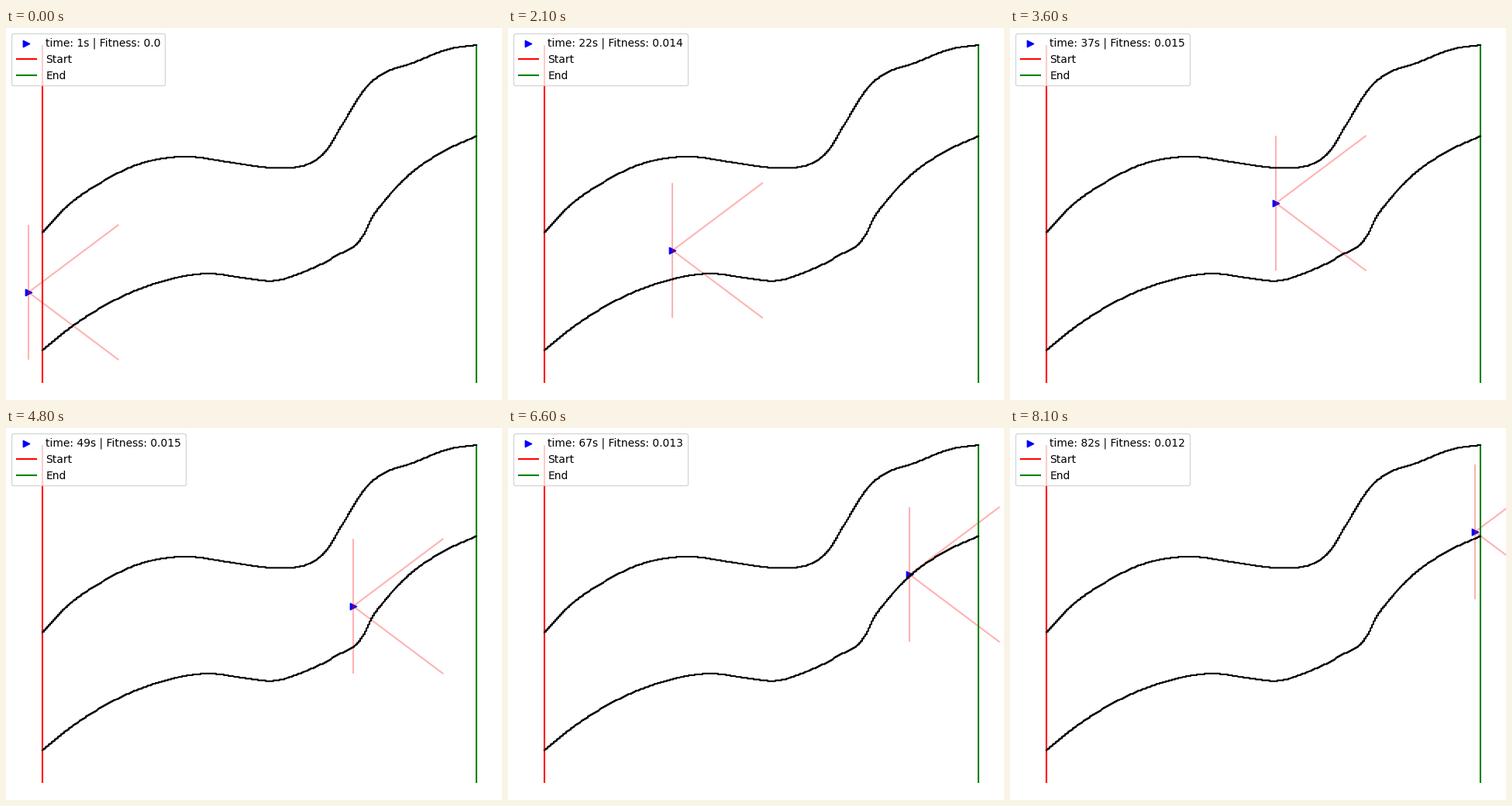
Animation, 640 px wide and 480 px high, one loop 8200 ms. Source, as a matplotlib script:

```python
import numpy as np
import matplotlib.pyplot as plt
from matplotlib.animation import FuncAnimation
from matplotlib.collections import LineCollection

W, H = 640, 480
FRAMES, INTERVAL = 82, 100
UNIT_X, UNIT_Y = W / 1.1, H / 1.1    # one data unit in pixels, 5 % margins
LEFT, TOP = 0.05 * UNIT_X, 0.05 * UNIT_Y
START_X, END_X = 47, 607
CRUISE = 0.015 * UNIT_X
REACH_X, REACH_Y = 0.2 * UNIT_X, 0.2 * UNIT_Y
RAYS = np.array([(0, -REACH_Y), (REACH_X, -REACH_Y),
                 (REACH_X, REACH_Y), (0, REACH_Y)])

UPPER = [(47, 264), (80, 229), (120, 201), (165, 178), (230, 166),
         (290, 173.5), (338, 180), (372, 180), (386, 177), (415, 156),
         (432, 128), (470, 71), (485, 60), (525, 45), (572, 27), (607, 22)]
LOWER = [(47, 416), (80, 389), (124, 360), (190, 330.5), (265, 317),
         (310, 323), (347, 326), (386, 314), (424, 295), (464, 262),
         (470, 249), (487, 225), (512, 197), (563, 160), (607, 139.5)]

# Frame and height of the car at the turns of its path
HEIGHTS = [(0, 341), (4, 343), (10, 334), (21, 287), (36, 226), (42, 221),
           (48, 230), (54, 219), (66, 189), (81, 134)]
HIT, FREE = 52, 66    # the car scrapes along the lower wall between these


def smooth(knots, t):
    """Cubic Hermite curve through the knots."""
    k, v = np.array(knots, float).T
    slope = np.gradient(v, k)
    i = np.clip(np.searchsorted(k, t, side="right") - 1, 0, len(k) - 2)
    h = k[i + 1] - k[i]
    s = (t - k[i]) / h
    return (v[i] * (1 + 2 * s) * (1 - s) ** 2 + slope[i] * h * s * (1 - s) ** 2
            + v[i + 1] * s * s * (3 - 2 * s) + slope[i + 1] * h * s * s * (s - 1))


def car_position(frame):
    x = LEFT + np.interp(frame, [0, HIT, FREE, FRAMES - 1],
                         [0, HIT * CRUISE, 489, 571])
    return x, smooth(HEIGHTS, frame)


def draw_wall(knots, step_x=2, step_y=1.1):
    """Draw a wall with the fine steps of a traced bitmap edge."""
    x = np.linspace(START_X, END_X, 2500)
    y = smooth(knots, x)
    x = START_X + np.round((x - START_X) / step_x) * step_x
    ax.plot(x, np.round(y / step_y) * step_y, color="black")


fig = plt.figure(figsize=(W / 100, H / 100), dpi=100)
ax = fig.add_axes([0, 0, 1, 1])
ax.set_xlim(0, W)
ax.set_ylim(H, 0)
ax.axis("off")

car = ax.scatter([LEFT], [341], marker=">", color="blue")
rays = ax.add_collection(LineCollection([], colors="red", alpha=0.3))
ax.vlines(START_X, TOP, H - TOP, color="red", label="Start")
ax.vlines(END_X, TOP, H - TOP, color="green", label="End")
draw_wall(UPPER)
draw_wall(LOWER)


def update(frame):
    pos = np.array(car_position(frame))
    seconds = frame + 1
    progress = (pos[0] - LEFT) / (END_X - LEFT)
    fitness = round(float(progress / seconds), 3)
    car.set_offsets([pos])
    car.set_label(f"time: {seconds}s | Fitness: {fitness}")
    rays.set_segments([(pos, pos + ray) for ray in RAYS])
    ax.legend(loc="upper left")
    return [car, rays]


anim = FuncAnimation(fig, update, frames=FRAMES, interval=INTERVAL,
                     repeat=True, repeat_delay=0, blit=False)
plt.show()
```
